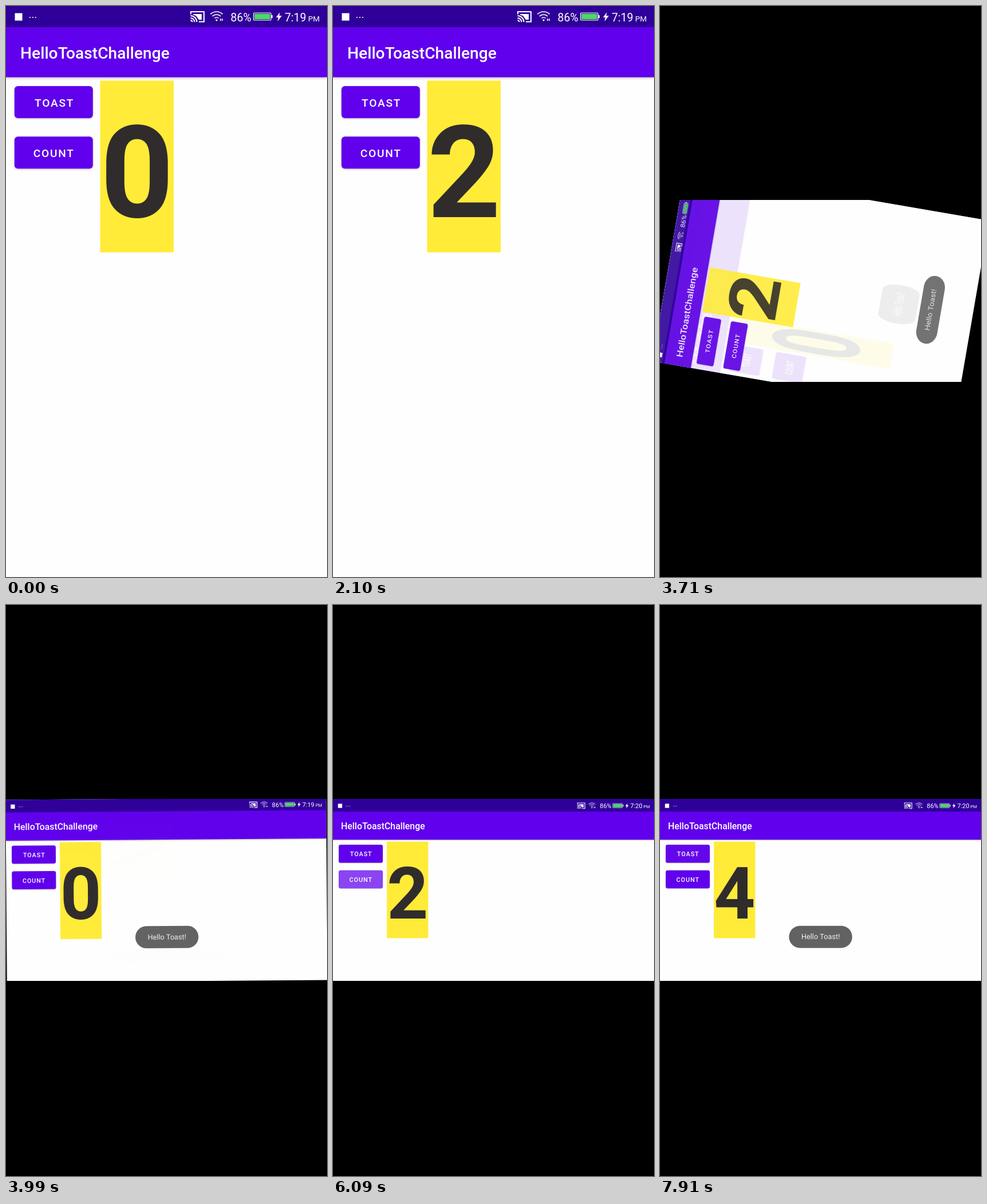
Animation, 561 px wide and 998 px high, one loop 8050 ms. Source, as an HTML page with a canvas:

```html
<!DOCTYPE html>
<html lang="en">
<head>
<meta charset="utf-8">
<title>HelloToastChallenge</title>
<style>
  html, body { margin: 0; width: 100%; height: 100%; overflow: hidden; background: #000; }
  canvas { display: block; width: 561px; height: 998px; }
</style>
</head>
<body>
<canvas id="stage" width="561" height="998"></canvas>
<script>
const ctx = document.getElementById('stage').getContext('2d');
const W = 561, H = 998, K = W / H;
const LOOP = 8050, STEP = 70, LAST = 7910;
const PURPLE = '#6000ec', STATUS = '#2f0099', PAPER = '#fefefe';
const FONT = 'Roboto, sans-serif';
const BLEED = 2.3;                    // landscape screen reaches past its layout

const TURN = 3080;                    // display switches to landscape
const SPIN = 3700, SPIN_TIME = 440;   // rotation settles
const MINUTE = 5950;
const COUNT_TAPS = [350, 910, 5250, 5740, 6230, 6720];
const TOAST_TAPS = [2310, 7330];
const TOASTS = [[2380, 4430], [7390, 9999]];

const clamp = v => Math.max(0, Math.min(1, v));
const lerp = (a, b, p) => a + (b - a) * p;

function text(str, x, y, size, weight = 400, color = '#fff', align = 'left', spacing = 0) {
  ctx.font = `${weight} ${size}px ${FONT}`;
  ctx.letterSpacing = spacing + 'px';
  ctx.textAlign = align;
  ctx.fillStyle = color;
  ctx.fillText(str, x, y);
}

function box(x, y, w, h, r = 0) {
  ctx.beginPath();
  ctx.roundRect(x, y, w, h, r);
}

function poly(...pts) {
  ctx.beginPath();
  for (let i = 0; i < pts.length; i += 2) ctx.lineTo(pts[i], pts[i + 1]);
}

function arc(x, y, r, from, to) {
  ctx.beginPath();
  ctx.arc(x, y, r, from * Math.PI, to * Math.PI);
  ctx.stroke();
}

function shadow(alpha, blur, dy, k) {
  ctx.shadowColor = `rgba(0,0,0,${alpha})`;
  ctx.shadowBlur = blur * k;
  ctx.shadowOffsetY = dy * k;
}

function castIcon() {
  ctx.lineWidth = 2;
  poly(323, 14.5, 323, 10, 346, 10, 346, 27.5, 337, 27.5);
  ctx.stroke();
  poly(327, 14, 342, 14, 342, 24, 337, 24, 332, 17, 327, 15.5);
  ctx.fill();
  for (const r of [3, 7, 11]) arc(322.5, 28, r, 1.5, 2);
}

function wifiIcon() {
  ctx.lineWidth = 1.6;
  for (const r of [5, 10, 15]) arc(368, 25, r, 1.25, 1.75);
  box(366.4, 23.2, 3.2, 3.2, 1.6);
  ctx.fill();
  box(374, 22, 1.6, 4);
  ctx.fill();
  box(377, 22, 1.6, 4);
  ctx.fill();
}

function batteryIcon() {
  ctx.lineWidth = 1.2;
  box(432.6, 12, 30.5, 13, 1.5);
  ctx.stroke();
  box(463.5, 16, 2.4, 5);
  ctx.fill();
  ctx.fillStyle = '#4cd964';
  box(434.2, 13.6, 27.3, 9.8);
  ctx.fill();
  ctx.fillStyle = '#fff';
  poly(478.5, 11, 472, 20, 476, 20, 474.5, 27, 482, 17, 477.5, 17);
  ctx.fill();
}

function statusBar(w, clock) {
  ctx.fillStyle = STATUS;
  ctx.fillRect(0, -BLEED, w, 37 + BLEED);
  ctx.fillStyle = '#fff';
  ctx.fillRect(15.5, 12.5, 13, 13);
  for (const x of [41, 46, 51]) ctx.fillRect(x, 19, 1.8, 1.8);
  ctx.save();
  ctx.translate(w - W, 0);
  ctx.strokeStyle = '#fff';
  castIcon();
  wifiIcon();
  batteryIcon();
  text('86%', 392.5, 26.5, 19.5);
  text(clock, 487, 26.5, 19.5);
  text('PM', 528, 26.5, 13.5);
  ctx.restore();
}

function button(label, x, y, textX, hot, taps, t, k) {
  const tap = taps.filter(v => v <= t).pop();
  const dt = tap === undefined ? 9999 : t - tap;
  const lift = clamp(dt / 60) * clamp((210 - dt) / 110);
  ctx.save();
  shadow(lerp(0.26, 0.42, lift), lerp(3.5, 11, lift), lerp(1, 3, lift), k);
  ctx.fillStyle = PURPLE;
  box(x, y, 137, 56, 6);
  ctx.fill();
  ctx.restore();

  const fade = clamp(1 - (dt - 250) / 350);
  if (fade > 0) {
    ctx.save();
    box(x, y, 137, 56, 6);
    ctx.clip();
    ctx.fillStyle = `rgba(255,255,255,${0.18 * clamp(dt / 70) * fade})`;
    ctx.fillRect(x, y, 137, 56);
    ctx.fillStyle = `rgba(255,255,255,${0.22 * fade})`;
    ctx.beginPath();
    ctx.arc(x + 52, y + hot, 12 + 138 * clamp(dt / 250) ** 2, 0, 7);
    ctx.fill();
    ctx.restore();
  }
  text(label, x + textX, y + 36, 19.2, 500, '#fff', 'left', 1.7);
}

function toastAlpha(t) {
  const now = TOASTS.find(([a, b]) => t >= a && t < b + 500);
  if (!now) return 0;
  const enter = clamp((t - now[0]) / 500), leave = clamp((t - now[1]) / 500);
  return (1 - (1 - enter) ** 2) * (1 - leave ** 2);
}

function toast(cx, cy, alpha) {
  if (!alpha) return;
  ctx.save();
  ctx.globalAlpha *= alpha;
  ctx.fillStyle = '#626262';
  box(cx - 98, cy - 34.5, 196.5, 69, 34.5);
  ctx.fill();
  text('Hello Toast!', cx + 0.3, cy + 7.7, 22.6, 400, '#f0f0f0', 'center');
  ctx.restore();
}

function screen(t, land, k) {
  const w = land ? H : W, h = land ? W : H, dx = land ? 3 : 0;
  ctx.fillStyle = PAPER;
  ctx.fillRect(0, -BLEED, w, h + 2 * BLEED);

  const count = COUNT_TAPS.filter(v => v <= t && (v > TURN) === land).length;
  ctx.fillStyle = '#ffeb38';
  ctx.fillRect(164.5 + dx, 130.5, 128.5, 300);
  text(String(count), 229 + dx, 368.6, 224, 700, '#302c2c', 'center');

  button('TOAST', 14.8 + dx, 140, 35.3, 30, TOAST_TAPS, t, k);
  button('COUNT', 14.8 + dx, land ? 219.5 : 228.3, 33, 41, COUNT_TAPS, t, k);

  ctx.save();
  shadow(0.3, 5, 1.5, k);
  ctx.fillStyle = PURPLE;
  ctx.fillRect(0, 30, w, 94.5);
  ctx.restore();
  text('HelloToastChallenge', 25, 91.5, 28.2, 500);
  statusBar(w, t < MINUTE ? '7:19' : '7:20');

  toast(w / 2, land ? 426.5 : 863.5, toastAlpha(t));
}

// Draws one orientation stretched between the two screen shapes as it rotates.
function turned(t, land, p) {
  const ow = land ? H : W, oh = land ? W : H;
  ctx.save();
  ctx.translate(W / 2, 498);
  ctx.scale(K, K);
  ctx.rotate(-Math.PI / 2 * (1 - p));
  ctx.scale(lerp(W, H, p) / ow, lerp(H, W, p) / oh);
  ctx.translate(-ow / 2, -oh / 2);
  if (!land) ctx.globalAlpha = 1 - p;
  screen(t, land, K);
  ctx.restore();
}

function draw(t) {
  ctx.fillStyle = '#000';
  ctx.fillRect(0, 0, W, H);
  if (t < TURN) {
    screen(t, false, 1);
    return;
  }
  const p = 1 - (1 - clamp((t - SPIN) / SPIN_TIME)) ** 5;
  ctx.save();
  ctx.beginPath();
  ctx.rect(0, 339, W, 318);
  ctx.clip();
  if (p > 0) turned(t, true, p);
  if (p < 1) turned(TURN, false, p);
  ctx.restore();
}

const start = performance.now();
function tick() {
  const t = (performance.now() - start) % LOOP;
  draw(Math.min(LAST, Math.floor(t / STEP) * STEP));
  requestAnimationFrame(tick);
}
tick();
</script>
</body>
</html>
```
